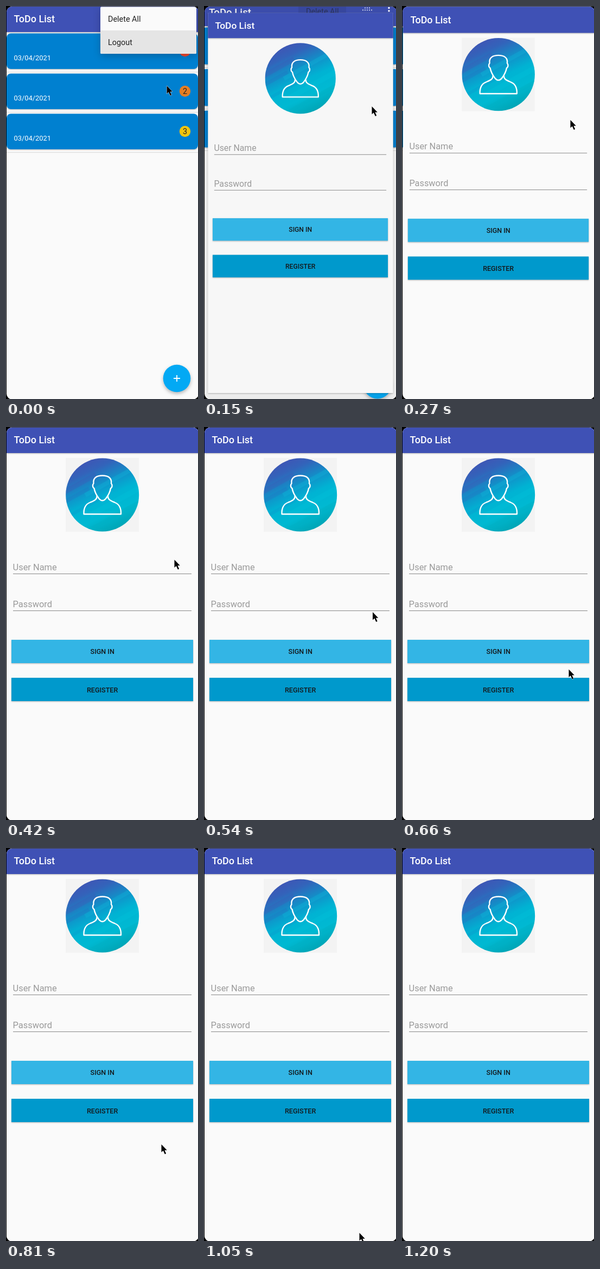
Recreate the animation shown at these times as an HTML page. Size 354 by 724 pixels, loop 1.35 s.

```html
<!DOCTYPE html>
<html lang="en">
<head>
<meta charset="utf-8">
<title>ToDo List</title>
<style>
  html, body { margin: 0; width: 100%; height: 100%; overflow: hidden; background: #000; }
  svg { display: block; width: 100vw; height: 100vh; }
  text { font-family: Roboto, sans-serif; }
  .title { font-size: 18px; font-weight: 500; fill: #fff; }
  .menu { font-size: 14.4px; fill: #212121; }
  .date { font-size: 12.9px; fill: #fff; }
  .rank { font-size: 14.4px; fill: #222; text-anchor: middle; }
  .hint { font-size: 16.4px; fill: #9a9a9a; }
  .label { font-size: 12.6px; font-weight: 500; fill: #14181b; text-anchor: middle; }
  .raised { filter: drop-shadow(0 1px 1px rgba(0,0,0,.28)); }
  .floating { filter: drop-shadow(0 3px 3px rgba(0,0,0,.28)); }
  .popup { filter: drop-shadow(0 4px 7px rgba(0,0,0,.22)); }
</style>
</head>
<body>
<svg viewBox="0 0 354 724">
  <defs>
    <clipPath id="screen"><rect x="1" y="1" width="354" height="723.5" rx="10"/></clipPath>
    <clipPath id="disc"><circle cx="177.7" cy="125" r="67.5"/></clipPath>
    <linearGradient id="sky" gradientUnits="userSpaceOnUse" x1="142" y1="62" x2="202" y2="192">
      <stop offset="0" stop-color="#4054b4"/>
      <stop offset=".16" stop-color="#3363ba"/>
      <stop offset=".36" stop-color="#128fc8"/>
      <stop offset=".55" stop-color="#00b3d3"/>
      <stop offset=".76" stop-color="#00b9d2"/>
      <stop offset="1" stop-color="#00a3b3"/>
    </linearGradient>
  </defs>
  <rect width="354" height="724"/>
  <rect x="8" width="346" height="1" fill="#444"/>
  <g clip-path="url(#screen)">
    <rect width="354" height="724" fill="#fafafa"/>
    <g id="list">
      <rect class="raised" x="-9" y="-20" width="374" height="68" fill="#3f51b5"/>
      <text class="title" x="14.6" y="30">ToDo List</text>
      <g id="cards"></g>
      <g class="floating"><circle cx="315" cy="686" r="25.3" fill="#03a9f4"/></g>
      <path d="M309 686h12M315 680v12" stroke="#fff" stroke-width="1.8"/>
    </g>
    <g id="popup">
      <g class="popup"><rect x="174" y="1.5" width="177" height="86.5" rx="2" fill="#fafafa"/></g>
      <path d="M174 45h177v41q0 2-2 2h-173q-2 0-2-2z" fill="#e5e5e5"/>
      <text class="menu" x="188" y="28.5">Delete All</text>
      <text class="menu" x="188" y="72">Logout</text>
    </g>
    <g id="fading">
      <rect width="354" height="724" opacity=".055"/>
      <rect x="174" width="88" height="14" opacity=".08"/>
      <text class="menu" x="188" y="14.5" opacity=".55">Delete All</text>
      <g id="dots" fill="#fff"></g>
    </g>
    <g id="login">
      <g class="raised"><rect id="page" x="1" y="0" width="354" height="726" fill="#fafafa"/></g>
      <rect class="raised" x="1" y="0" width="354" height="48" fill="#3f51b5"/>
      <text class="title" x="14.6" y="30">ToDo List</text>
      <rect id="frame" x="110" y="57" width="135" height="136" fill="#f3f3f3"/>
      <g clip-path="url(#disc)">
        <rect x="110" y="57" width="136" height="136" fill="url(#sky)"/>
        <g id="streaks" transform="rotate(-29 178 125)"></g>
      </g>
      <g fill="none" stroke="#fff" stroke-width="2.4" stroke-linejoin="round">
        <path d="M162.5 113C159 111 159.500 106 161.500 104C160 94 167 89.500 177.700 89.500S195.500 94 194 104C196 106 196.500 111 193 113C191.500 122 187 128 184 132Q177.700 139 171.500 132C168.500 128 164 122 162.500 113Z"/>
        <path d="M167.500 127C168 134 162 136 155 139C147 142 143 148 143.500 160.500H212C212.500 148 208.500 142 200.500 139C193.500 136 187.500 134 188 127"/>
      </g>
      <text class="hint" x="12.6" y="264">User Name</text>
      <text class="hint" x="12.6" y="332">Password</text>
      <path d="M13 270.500h329M13 338.500h329" stroke="#888"/>
      <rect class="raised" x="10" y="392" width="335" height="43" fill="#33b5e5"/>
      <rect class="raised" x="10" y="462" width="335" height="43" fill="#0099cc"/>
      <text class="label" x="177.700" y="418">SIGN IN</text>
      <text class="label" x="177.700" y="488.500">REGISTER</text>
    </g>
    <path id="cursor" d="M0 0V14.500L3.300 11.500L6.300 18L8.700 17L5.900 10.800H10.300Z" stroke="#fff" stroke-width="1" paint-order="stroke"/>
  </g>
</svg>
<script>
const LOOP = 1350;
const $ = id => document.getElementById(id);
const show = (id, on) => $(id).setAttribute('display', on ? 'inline' : 'none');

// time, login scale (0 = closed), cursor tip
const steps = [
  [0, 0, 296.5, 147],
  [150, .9645, 309.5, 185],
  [270, .995, 310.5, 210],
  [420, 1, 310.5, 244.5],
  [540, 1, 311, 341],
  [660, 1, 307.5, 446.5],
  [810, 1, 286.5, 546],
  [930, 1, 274.5, 640],
  [1050, 1, 286.500, 709],
  [1200, 1, 286, 760]
];

$('cards').innerHTML = ['#f4492f', '#e67e22', '#f1c40f'].map((color, i) => `
  <g transform="translate(0 ${i * 74})">
    <path d="M0 121.800h354" stroke="#d6d6d6"/>
    <rect class="raised" x="1" y="50.500" width="353" height="65.500" rx="8" fill="#0080d0"/>
    <text class="date" x="14.500" y="99.500">03/04/2021</text>
    <circle cx="330" cy="83" r="10.200" fill="${color}"/>
    <text class="rank" x="330" y="88">${i + 1}</text>
  </g>`).join('');

const dot = (x, y, r) => `<circle cx="${x}" cy="${y}" r="${r}"/>`;
$('dots').innerHTML =
  [297, 301, 305].map(x => dot(x, 3.5, .9)).join('') +
  [293, 297, 301, 305, 309].map(x => dot(x, 7.5, .9)).join('') +
  dot(341, 3.5, 1.7) + dot(341, 9, 1.7);

// Soft diagonal bands: y, height, x, width, tint
$('streaks').innerHTML = [
  [82, 9, 100, 85, '#4054b4'],
  [99, 7, 100, 62, '#2a6cbd'],
  [106, 8, 150, 110, '#0fb9da'],
  [126, 6, 95, 80, '#118fc8'],
  [142, 10, 140, 110, '#00c0da'],
  [166, 7, 110, 130, '#00adbf']
].map(([y, h, x, w, tint]) =>
  `<rect x="${x}" y="${y}" width="${w}" height="${h}" fill="${tint}" opacity=".28"/>`).join('');

const zoom = k => `translate(177.5 362) scale(${k}) translate(-177.5 -362)`;

function draw(t) {
  const [, scale, x, y] = steps.filter(s => s[0] <= t).pop();
  const opening = scale > 0 && scale < .99;
  show('popup', !scale);
  show('login', scale > 0);
  show('fading', opening);
  show('frame', !opening);
  $('list').setAttribute('transform', zoom(scale ? 1.035 : 1));
  $('login').setAttribute('transform', zoom(scale || 1));
  $('page').setAttribute('fill', opening ? '#f7f7f7' : '#fafafa');
  $('cursor').setAttribute('transform', `translate(${x} ${y})`);
}

const start = performance.now();
function tick() {
  draw((performance.now() - start) % LOOP);
  requestAnimationFrame(tick);
}
tick();
</script>
</body>
</html>
```
